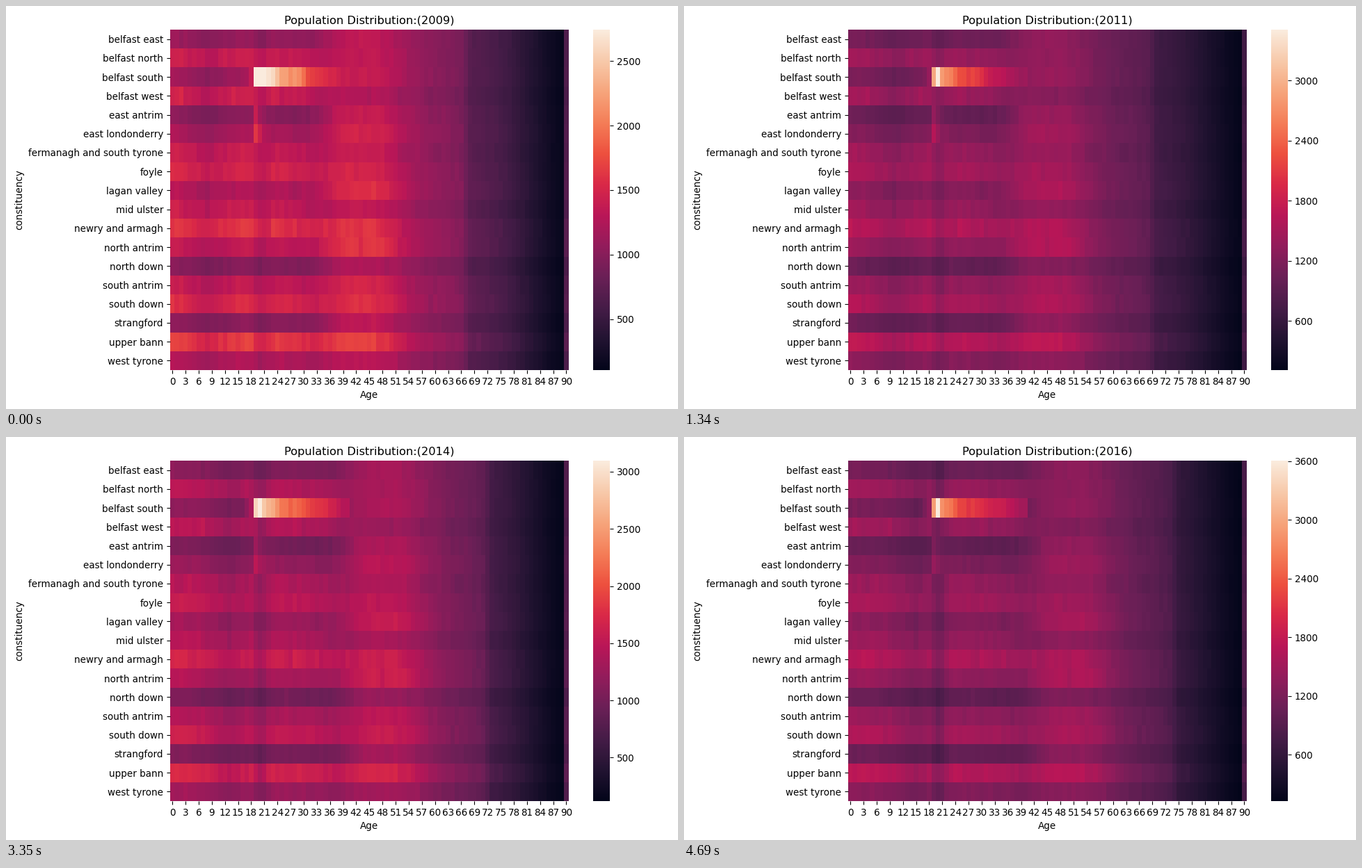
Write a matplotlib script that moves like this. It is 966x580 px and loops after 7370 ms.

```python
import numpy as np
import matplotlib.pyplot as plt
from matplotlib.animation import FuncAnimation
from matplotlib.colors import LinearSegmentedColormap

plt.rcParams.update({"font.family": "DejaVu Sans", "font.size": 9.75})

WIDTH, HEIGHT, DPI = 966, 580, 100
FIRST_YEAR, LAST_YEAR = 2009, 2016
TICK_MS, TICKS = 670, 11
AGES = np.arange(91)
SPAN = LAST_YEAR - FIRST_YEAR

ROCKET = LinearSegmentedColormap.from_list("rocket", [
    "#03051a", "#221331", "#451c47", "#6a1f56", "#921c5b", "#b91657",
    "#d92847", "#ed503e", "#f47d57", "#f6a47b", "#f7c9aa", "#faebdd"])

# Typical size of a one-year cohort: young people, people around forty.
SEATS = {
    "belfast east": (1120, 1340),
    "belfast north": (1450, 1360),
    "belfast south": (1150, 1380),
    "belfast west": (1460, 1270),
    "east antrim": (1030, 1400),
    "east londonderry": (1220, 1480),
    "fermanagh and south tyrone": (1430, 1400),
    "foyle": (1530, 1500),
    "lagan valley": (1300, 1550),
    "mid ulster": (1430, 1360),
    "newry and armagh": (1650, 1600),
    "north antrim": (1390, 1620),
    "north down": (1030, 1250),
    "south antrim": (1400, 1510),
    "south down": (1570, 1570),
    "strangford": (1050, 1320),
    "upper bann": (1690, 1680),
    "west tyrone": (1290, 1320),
}
COLLEGE_SEATS = {"east antrim", "east londonderry"}
STUDENT_PEAKS = [2743, 3085, 3506, 3202, 3150, 3097, 3350, 3607]

rng = np.random.default_rng(11)
JITTER = 1 + rng.normal(0, 0.018, (len(SEATS), AGES.size + SPAN))


def smoothstep(x, start, end):
    t = np.clip((x - start) / (end - start), 0, 1)
    return t * t * (3 - 2 * t)


def bump(x, centre, width):
    return np.exp(-((x - centre) / width) ** 2)


def older_size(middle):
    return 470 + 0.4 * middle


def cohort_sizes(young, middle, born):
    """Cohort sizes by age in the first year; negative means not yet born."""
    youth = young * np.interp(born, [-5, 1, 8, 16, 26], [1.04, 1.01, 0.88, 1, 0.96])
    older = older_size(middle) * np.interp(born, [56, 61, 66, 68, 90],
                                           [1.06, 1, 0.94, 0.74, 0.68])
    sizes = youth + (middle - youth) * smoothstep(born, 28, 40)
    sizes *= 1 - 0.08 * bump(born, 33, 4)
    return sizes + (older - sizes) * smoothstep(born, 45, 58)


def add_students(row, shift):
    """Fill the student ages, with the largest year group on top."""
    ages = np.arange(17, 41)
    knots = [17, 18, 19, 22, 24, 25, 29, 31 + 0.6 * shift, 35 + 0.7 * shift, 41]
    sizes = [1200, 1400, 2900, 2700, 2450, 2250, 2150, 1780, 1520, 1400]
    peak = STUDENT_PEAKS[shift]
    row[ages] = np.minimum(np.interp(ages, knots, sizes) * JITTER[2, ages], peak)
    row[round(20 - np.cos(2 * np.pi * (shift - 1) / 5))] = peak


def seat_row(index, name, shift):
    young, middle = SEATS[name]
    born = AGES - shift
    row = cohort_sizes(young, middle, born) * JITTER[index, born + SPAN]
    row /= 1 + np.exp((AGES - 82) / 5)

    adult = AGES >= 19
    if name == "belfast south":
        add_students(row, shift)
    elif name in COLLEGE_SEATS:
        row *= 1 + adult * (0.38 - 0.02 * shift) * np.exp((19 - AGES) / 1.2)
    else:
        row *= 1 - adult * (0.1 + 0.012 * shift) * bump(AGES, 20.3, 1.7)

    row[90] = older_size(middle) * (0.64 + 0.02 * shift)  # everyone 90 and over
    return row


def population(shift):
    return np.array([seat_row(i, name, shift) for i, name in enumerate(SEATS)])


def pixel_axes(left, top, right, bottom):
    return fig.add_axes([left / WIDTH, 1 - bottom / HEIGHT,
                         (right - left) / WIDTH, (bottom - top) / HEIGHT])


fig = plt.figure(figsize=(WIDTH / DPI, HEIGHT / DPI), dpi=DPI, facecolor="white")
ax = pixel_axes(236, 34, 808.6, 524)
mesh = ax.pcolormesh(population(0), cmap=ROCKET)
ax.invert_yaxis()
ax.set_xticks(AGES[::3] + 0.5, AGES[::3])
ax.set_yticks(np.arange(len(SEATS)) + 0.5, SEATS)
ax.set_xlabel("Age")
ax.set_ylabel("constituency")
ax.spines[:].set_visible(False)
title = ax.set_title("")

bar = fig.colorbar(mesh, cax=pixel_axes(844, 34, 868, 524))
bar.outline.set_visible(False)


def draw(tick):
    shift = min(tick, SPAN)
    low, high = 105 + 3 * shift, STUDENT_PEAKS[shift]
    step = 500 if high < 3100 else 600
    mesh.set_array(population(shift))
    mesh.set_clim(low, high)
    bar.set_ticks(np.arange(step, high, step))
    title.set_text(f"Population Distribution:({FIRST_YEAR + shift})")
    return mesh, title


animation = FuncAnimation(fig, draw, frames=TICKS, init_func=lambda: draw(0),
                          interval=TICK_MS, repeat=True, repeat_delay=0)
plt.show()
```
